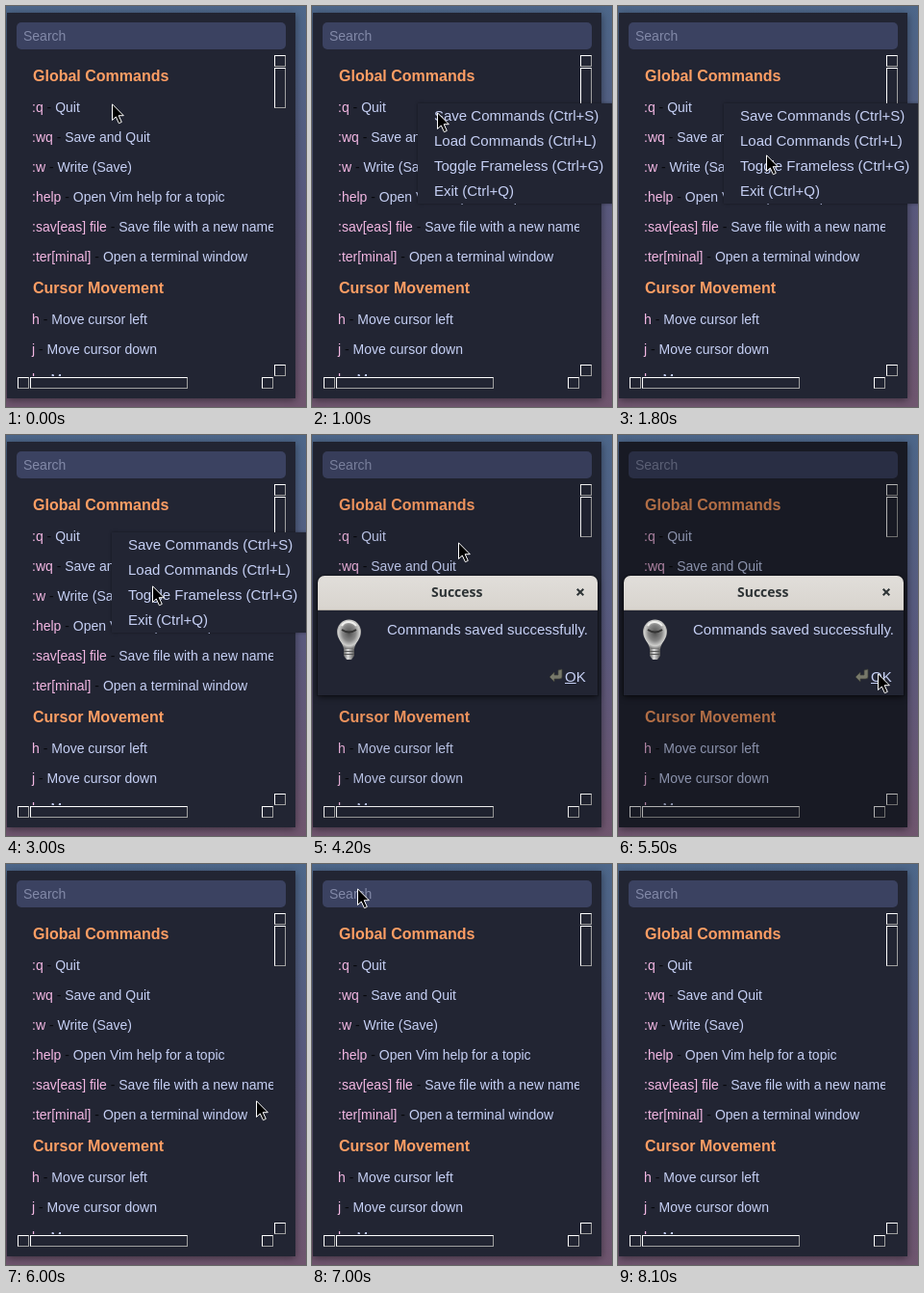
An HTML page for the animation above (8300 ms loop, 312 by 416 pixels).

```html
<!DOCTYPE html>
<html lang="en">
<head>
<meta charset="utf-8">
<title>Command list</title>
<style>
  html, body { margin: 0; width: 100%; height: 100%; overflow: hidden; }
  body {
    position: relative; color: #c6d0f5; white-space: pre;
    font: 15px/17px "Liberation Sans", Arial, sans-serif;
    background: linear-gradient(#4d678a, #5a5a7e 50%, #70566f);
  }
  body div, body svg, #dialog span { position: absolute; }
  #window, #dim { left: 1px; top: 7px; width: 300px; height: 400px; }
  #window { background: #222533; box-shadow: 0 2px 8px rgba(0, 0, 0, .45); }
  #dim { background: #000; opacity: 0; }
  #search {
    left: 11px; top: 17px; width: 273px; height: 22px; padding: 6px 0 0 7px;
    border-radius: 5px; background: #3b4261; color: #8289a8; font-size: 14px; line-height: 16px;
  }
  #list { left: 11px; top: 51px; width: 251px; height: 321px; padding: 12px 0 0 16px; overflow: hidden; }
  #list p { margin: 0; height: 31px; font-size: 14px; line-height: 16px; }
  #list h2 { margin: 1px 0 0 1px; height: 33px; font-size: 16px; line-height: 17px; color: #ff9e64; }
  #list b { font-weight: normal; color: #f4b8e4; }
  #list i { font-style: normal; color: #08090d; }
  .bevel { box-sizing: border-box; border: 1px solid; border-color: #fff #a0a0a0 #a0a0a0 #fff; }
  #menu {
    left: 110px; top: 101px; width: 193px; height: 100px; padding: 4px 0 0 17px;
    background: #222533; box-shadow: 0 0 3px rgba(0, 0, 0, .4);
  }
  #menu p { margin: 0; height: 26px; }
  #dialog {
    left: 6px; top: 145.5px; width: 291px; height: 124.5px; border-radius: 7px 7px 0 0;
    background: linear-gradient(#e1deda, #d8d4ce 35.5px, #b5afa7 35.5px, #b5afa7 36.5px, #222533 36.5px);
    box-shadow: 0 0 0 1px rgba(0, 0, 0, .2), 0 2px 6px rgba(0, 0, 0, .6);
  }
  #title { left: 118px; top: 7.5px; font: bold 14px/19px "Noto Sans", "Open Sans", sans-serif; color: #2e3436; }
  #dialog svg { left: -6px; top: -145.5px; }
  #message { left: 72px; top: 47.5px; }
  #ok { left: 257px; top: 96.5px; }
  #cursor { left: 0; top: 0; }
</style>
</head>
<body><div id="window"></div><div id="search">Search</div><div id="list"></div><div id="dim"></div><div id="menu"></div><div id="dialog">
  <svg width="312" height="280" fill="none">
    <defs>
      <radialGradient id="glass" cx=".5" cy=".45" r=".55">
        <stop stop-color="#505050"/><stop offset=".5" stop-color="#868686"/>
        <stop offset=".8" stop-color="#cfcfcd"/><stop offset="1" stop-color="#777"/>
      </radialGradient>
      <linearGradient id="metal">
        <stop stop-color="#666"/><stop offset=".4" stop-color="#ddd"/><stop offset="1" stop-color="#555"/>
      </linearGradient>
    </defs>
    <path d="M275.7 159.7l6.6 6.6m0-6.6l-6.6 6.6" stroke="#2e3436" stroke-width="2"/>
    <path d="M33 222C32 215 26 212 26 204a12.5 12.5 0 0 1 25 0C51 212 45 215 44 222Z" fill="url(#glass)"/>
    <path d="M31 202q7.500 5 15 0" stroke="#333" stroke-width="2"/>
    <path d="M31 198q2-4 7-4t8 4" stroke="#f0f0ee" stroke-width="2"/>
    <path d="M33 222H44V229L41 233H36L33 229Z" fill="url(#metal)"/>
    <path d="M33 224.500H44M33 227.500H44" stroke="#555"/>
    <path d="M247 251l5-5v3h4v-5l4-1v8q0 2-3 2h-5v3Z" fill="#77786a" stroke="#3d4037" stroke-width=".7"/>
  </svg><span id="title">Success</span><span id="message">Commands saved successfully.</span><span id="ok"><u>O</u>K</span></div>
<svg id="cursor" width="14" height="23"><path d="M.5 .8V17.500L4.300 14L7.400 20.700L10.300 19.400L7.200 12.700H12.300Z" stroke="#fff" stroke-linejoin="round"/></svg>
<script>
const $ = id => document.getElementById(id);

// Lines without a dash are headings.
$('list').innerHTML = `Global Commands
:q - Quit
:wq - Save and Quit
:w - Write (Save)
:help - Open Vim help for a topic
:sav[eas] file - Save file with a new name
:ter[minal] - Open a terminal window
Cursor Movement
h - Move cursor left
j - Move cursor down
k - Move cursor up`.split('\n').map(line => {
  const [key, label] = line.split(' - ');
  return label ? `<p><b>${key}</b><i> - </i>${label}</p>` : `<h2>${key}</h2>`;
}).join('');

$('menu').innerHTML = ['Save Commands (Ctrl+S)', 'Load Commands (Ctrl+L)', 'Toggle Frameless (Ctrl+G)', 'Exit (Ctrl+Q)']
  .map(label => `<p>${label}</p>`).join('');

// A scrollbar piece is a 12px button unless it is given a length.
function bevel(x, y, w = 12, h = 12) {
  $('dim').insertAdjacentHTML('beforebegin',
    `<div class="bevel" style="left:${x}px;top:${y}px;width:${w}px;height:${h}px"></div>`);
}
bevel(279, 51);
bevel(279, 64, 12, 42);
bevel(279, 372);
bevel(12, 385);
bevel(25, 385, 164);
bevel(266, 385);

const clamp = v => Math.min(1, Math.max(0, v));
const ramp = (t, from, to) => clamp((t - from) / (to - from));
const show = (id, on) => $(id).style.visibility = on ? 'visible' : 'hidden';

// Pointer moves: start time, end time, and where it goes
const home = [110, 101];
const moves = [
  [900, 1100, 149, 119], [1500, 1800, 154, 154], [1900, 2400, 154, 171], [2800, 3200, 149, 141],
  [3400, 3700, 152, 111], [4200, 5000, 287, 254], [5000, 5500, 270, 247],
  [5800, 6000, 260, 245], [6000, 6400, 96, 82], [6700, 7100, 31, 6]
];

function pointer(t) {
  let [x, y] = home;
  for (const [from, to, toX, toY] of moves) {
    const k = ramp(t, from, to);
    x += (toX - x) * k;
    y += (toY - y) * k;
  }
  return [x, y].map(Math.round);
}

function draw() {
  const t = Math.floor(performance.now() % 8300 / 100) * 100;
  const [x, y] = pointer(t);
  show('menu', t >= 400 && t < 4200);
  show('dialog', t >= 4200 && t < 5800);
  show('cursor', t < 7200);
  $('dim').style.opacity = t < 4200 ? 0 : .3 * (ramp(t, 4075, 4575) - ramp(t, 5700, 5950));
  $('cursor').style.transform = `translate(${x}px, ${y}px)`;
  requestAnimationFrame(draw);
}
draw();
</script>
</body>
</html>
```
